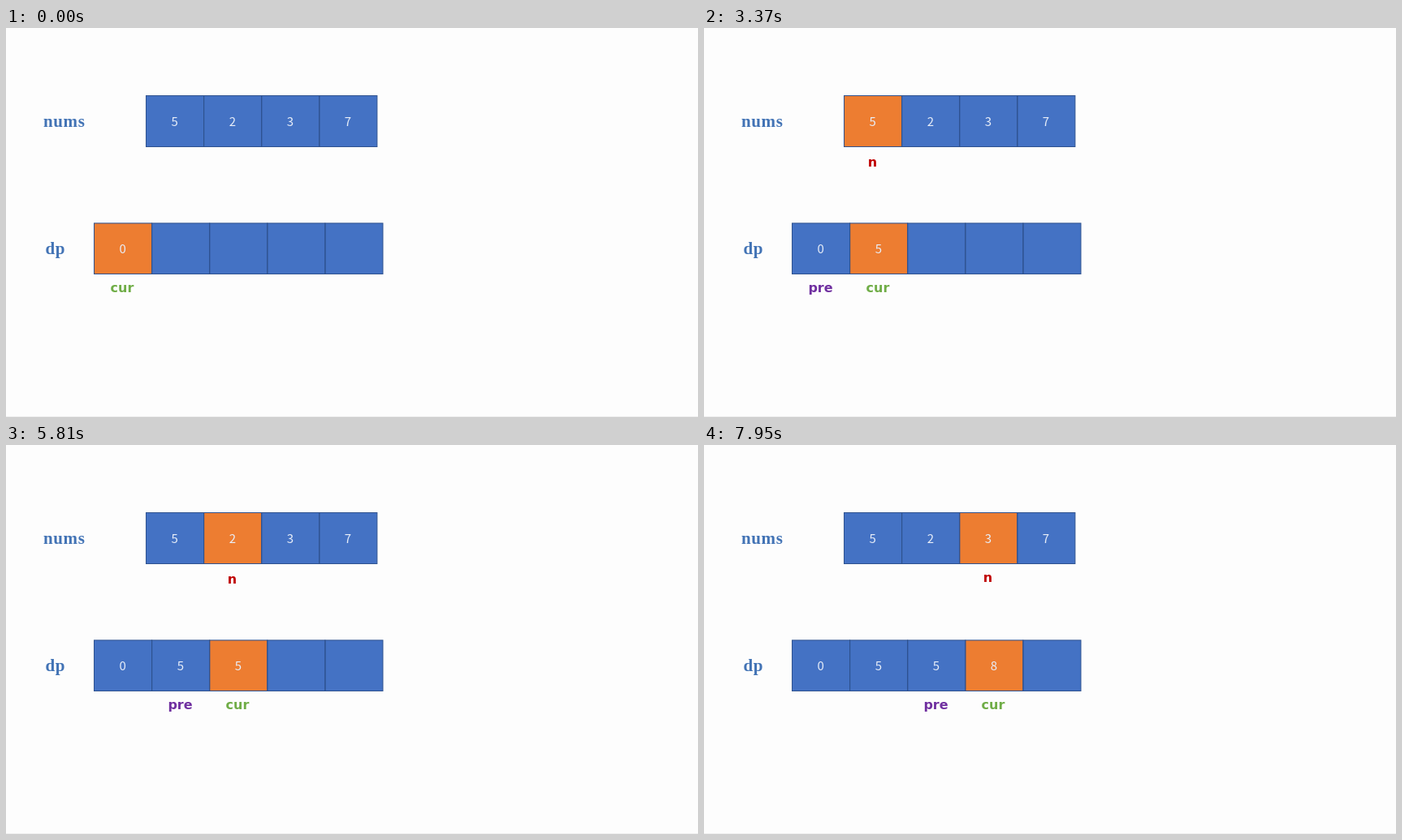
Animation, 852 px wide and 480 px high, one loop 7990 ms. Source, as an HTML page with a canvas:

```html
<!DOCTYPE html>
<html lang="en">
<head>
<meta charset="utf-8">
<title>Array steps</title>
<style>
  html, body { margin: 0; width: 100%; height: 100%; overflow: hidden; background: #fdfdfd; }
  canvas { display: block; }
</style>
</head>
<body>
<canvas id="stage" width="852" height="480"></canvas>
<script>
const ctx = document.getElementById('stage').getContext('2d');
const LOOP = 7990, STEP = 2000, FIRST_CUT = 1980;
const CELL = 71.1;
const PAPER = '#fdfdfd', BLUE = '#4472c4', ORANGE = '#ed7d31', BORDER = '#2f528f', DIGIT = '#e8eef8';
const nums = [5, 2, 3, 7];
const dp = [0, 5, 5, 8];

function text(str, x, y, font, color, align = 'center') {
  ctx.font = font;
  ctx.fillStyle = color;
  ctx.textAlign = align;
  ctx.fillText(str, x, y);
}

function title(str, x, y) {
  ctx.letterSpacing = '0.6px';
  text(str, x, y, 'bold 21px "Liberation Serif", serif', '#4273b5', 'left');
  ctx.letterSpacing = '0px';
}

function pointer(str, x, y, color) {
  text(str, x, y, 'bold 16px "DejaVu Sans", sans-serif', color);
}

function row(x, y, height, count, values, active) {
  const edge = i => x + i * CELL;
  ctx.fillStyle = BLUE;
  ctx.fillRect(x, y, count * CELL, height);
  ctx.fillStyle = ORANGE;
  if (active >= 0) ctx.fillRect(edge(active), y, CELL, height);

  ctx.strokeStyle = BORDER;
  ctx.lineWidth = 1;
  for (let i = 0; i < count; i++) ctx.strokeRect(edge(i), y, CELL, height);

  values.forEach((value, i) => text(value, edge(i) + 35.2, y + 37.3,
    '300 15px "Noto Sans CJK SC", "Noto Sans", sans-serif', DIGIT));
}

function draw(time) {
  const t = time % LOOP;
  const step = t < FIRST_CUT ? 0 : 1 + Math.floor((t - FIRST_CUT) / STEP);
  const current = 143 + step * 71;

  ctx.fillStyle = PAPER;
  ctx.fillRect(0, 0, 852, 480);
  ctx.fillStyle = '#f0f0f0';
  ctx.fillRect(0, 479, 852, 1);

  title('nums', 46, 122);
  title('dp', 48.5, 279);
  row(172.5, 83.5, 63, 4, nums, step - 1);
  row(108.5, 240.9, 62.6, 5, dp.slice(0, step + 1), step);

  pointer('cur', current, 326, '#70ad47');
  if (step > 0) {
    pointer('pre', current - 70.5, 326, '#7030a0');
    pointer('n', current - 6.5, step === 3 ? 169 : 171, '#c00000');
  }
}

const start = performance.now();
function tick() {
  draw(performance.now() - start);
  requestAnimationFrame(tick);
}
tick();
</script>
</body>
</html>
```
